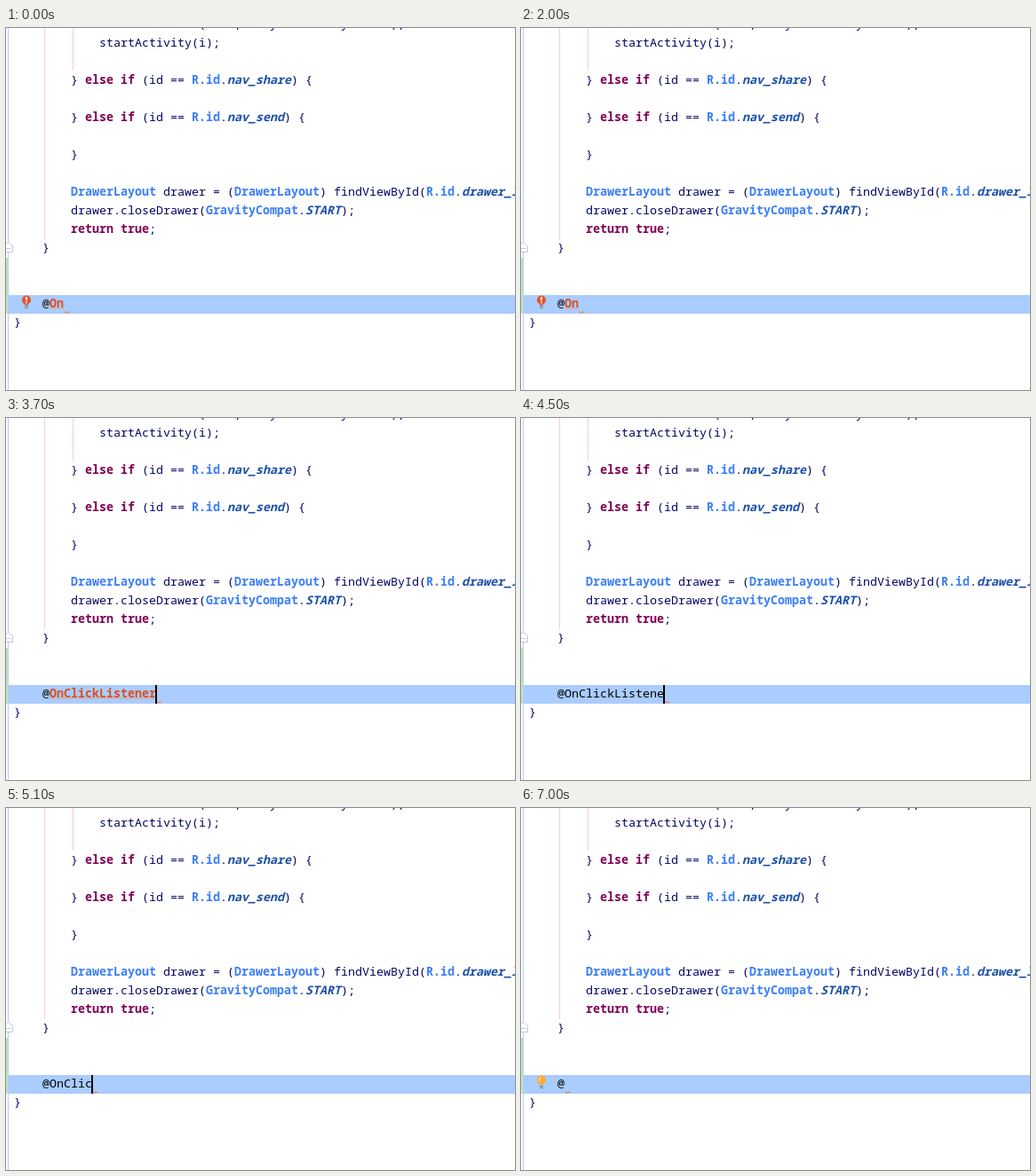
These frames come from a looping animation (573x408 px, 8000 ms). An HTML page:

```html
<!DOCTYPE html>
<html lang="en">
<head>
<meta charset="utf-8">
<title>Code editor</title>
<style>
  html, body { margin: 0; width: 573px; height: 408px; overflow: hidden; background: #fff; }
  svg { display: block; }
  text { font: 500 13.333px "Noto Sans Mono", "DejaVu Sans Mono", monospace; white-space: pre; fill: #060664; }
  .key { font-weight: 700; fill: #7f0055; }
  .type { font-weight: 700; fill: #3c7ff5; }
  .const { font-weight: 700; font-style: italic; fill: #1a4fa8; }
  .typed { fill: #000; }
  .unknown { font-weight: 700; fill: #dc4f1c; }
</style>
</head>
<body>
<svg id="stage" width="573" height="408" viewBox="0 0 573 408">
  <rect width="573" height="408" fill="#fff"/>
  <g shape-rendering="crispEdges">
    <rect x="0" y="259" width="2" height="63" fill="#bce6b4"/>
    <rect x="2" y="0" width="1" height="408" fill="#b9ccf8"/>
    <rect x="43" y="0" width="1" height="238" fill="#f8c6ee"/>
    <rect x="75" y="0" width="1" height="48" fill="#f8c6ee"/>
    <rect x="3" y="301" width="570" height="21" fill="#aaccff"/>
  </g>
  <path d="M2.5 241.5L7.5 245.5V252.5H-3V245.5ZM0 248.5H5" fill="#fff" stroke="#b9c9e6"/>
  <g id="code"></g>
  <g id="bulb">
    <path d="M23 301.5a5 5 0 0 1 3 9q-.8.7-1 1.7h-4q-.2-1-1-1.7a5 5 0 0 1 3-9Z"/>
    <path d="M21 313.5h4M21.5 315.3h3" stroke="#77777d" stroke-width="1.2"/>
    <path id="alert" d="M23 303v4.2M23 308.6v1.6" stroke="#fff" stroke-width="1.7"/>
    <path id="glow" d="M21 308q-1-3 2-4" fill="none" stroke="#ffe2a0" stroke-width="1.3"/>
  </g>
  <path id="underline" fill="none" stroke="#e0a596" stroke-dasharray="2" shape-rendering="crispEdges"/>
  <text id="at" class="typed" x="41" y="315">@</text>
  <text id="word" x="49" y="315"></text>
  <path id="squiggle" d="M.5 319.5L2.5 321.5L4.5 319.5L6.5 321.5" fill="none" stroke="#ee6a3a"/>
  <rect id="caret" y="301" width="2" height="21" fill="#000" shape-rendering="crispEdges"/>
</svg>
<script>
const LOOP = 8000, CELL = 8, LINE = 21, LEFT = 9;
const WORD = "OnClickListener", WORD_X = 49;
const $ = id => document.getElementById(id);

// row, column, then pairs of style and text
const code = [
  [-1, 12, "", "i = ", "key", "new", "", " Intent(", "key", "this", "", ", PlayerActivity.", "key", "class", "", ");"],
  [0, 12, "", "startActivity(i);"],
  [2, 8, "", "} ", "key", "else if", "", " (id == ", "type", "R.id", "", ".", "const", "nav_share", "", ") {"],
  [4, 8, "", "} ", "key", "else if", "", " (id == ", "type", "R.id", "", ".", "const", "nav_send", "", ") {"],
  [6, 8, "", "}"],
  [8, 8, "type", "DrawerLayout", "", " drawer = (", "type", "DrawerLayout", "", ") findViewById(",
    "type", "R.id", "", ".", "const", "drawer_layout", "", ");"],
  [9, 8, "", "drawer.closeDrawer(", "type", "GravityCompat", "", ".", "const", "START", "", ");"],
  [10, 8, "key", "return true", "", ";"],
  [11, 4, "", "}"],
  [15, 0, "", "}"]
];

for (const [row, start, ...runs] of code) {
  let col = start;
  for (let i = 0; i < runs.length; i += 2) {
    const run = document.createElementNS("http://www.w3.org/2000/svg", "text");
    run.setAttribute("class", runs[i]);
    run.setAttribute("x", LEFT + col * CELL);
    run.setAttribute("y", LINE * (row + 1));
    run.textContent = runs[i + 1];
    $("code").append(run);
    col += runs[i + 1].length;
  }
}

// time, letters shown, unknown-symbol style, caret, bulb, squiggle
const steps = [
  [0, 2, 1, 0, "red", 1],
  [1100, 2, 1, 1, "", 1],
  [2000, 2, 1, 0, "red", 1],
  [2500, 2, 1, 1, "red", 1],
  [3000, 2, 1, 0, "red", 1],
  [3400, 15, 0, 1, "", 1],
  [3700, 15, 1, 1, "", 1],
  [4500, 14, 0, 1, "", 1],
  [4800, 14, 1, 1, "", 1],
  [4900, 12, 0, 1, "", 1],
  [5000, 9, 0, 1, "", 1],
  [5100, 6, 0, 1, "", 1],
  [5200, 2, 0, 1, "", 1],
  [5500, 1, 0, 1, "", 1],
  [5700, 0, 0, 1, "", 0],
  [6000, 0, 0, 1, "", 1],
  [6800, 0, 0, 1, "yellow", 1],
  [7000, 0, 0, 0, "yellow", 1]
];

const show = (id, on) => { $(id).style.display = on ? "" : "none"; };
let current;

function draw(time) {
  const step = steps.findLast(s => s[0] <= time);
  if (step === current) return;
  current = step;
  const [, count, unknown, caret, bulb, squiggle] = step;
  const width = count * CELL, end = WORD_X + width;
  $("word").textContent = WORD.slice(0, count);
  $("word").setAttribute("class", unknown ? "unknown" : "typed");
  // two offset dashed rows form a small wave
  $("underline").setAttribute("d", `M${WORD_X} 315.5h${width}M${WORD_X + 2} 316.5h${width - 2}`);
  $("caret").setAttribute("x", end - 1);
  $("squiggle").setAttribute("transform", `translate(${end} 0)`);
  $("bulb").setAttribute("fill", bulb === "red" ? "#e2572f" : "#f4ae3d");
  show("underline", unknown);
  show("caret", caret);
  show("squiggle", squiggle);
  show("bulb", bulb);
  show("alert", bulb === "red");
  show("glow", bulb === "yellow");
}

const begin = performance.now();
function tick() {
  draw((performance.now() - begin) % LOOP);
  requestAnimationFrame(tick);
}
tick();
</script>
</body>
</html>
```
